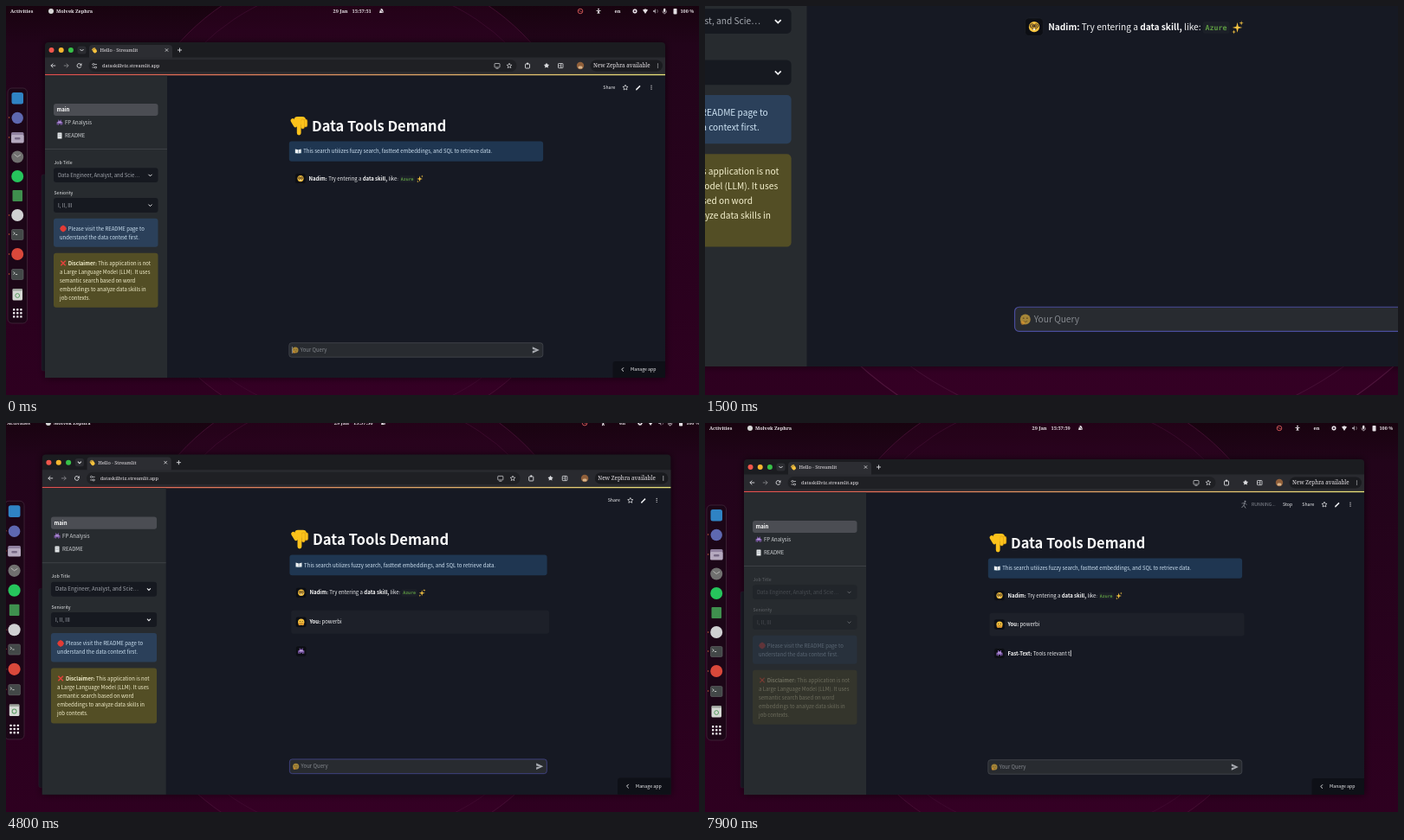
Animation, 800 px wide and 450 px high, one loop 8000 ms. Source, as an HTML page with a canvas:

```html
<!DOCTYPE html>
<html lang="en">
<head>
<meta charset="utf-8">
<title>Data Tools Demand</title>
<style>
html, body { margin: 0; height: 100%; overflow: hidden; background: #24041b; }
canvas { display: block; width: 800px; height: 450px; }
</style>
</head>
<body>
<canvas></canvas>
<script>
const LOOP = 8000;
const SANS = '"Noto Sans CJK JP","Noto Sans CJK SC","Noto Sans",sans-serif';
const SERIF = '"Noto Serif",serif';
const MONO = '"DejaVu Sans Mono",monospace';
const BODY = 5.96, SMALL = 5.2;
const canvas = document.querySelector('canvas');
const c = canvas.getContext('2d');
const dpr = window.devicePixelRatio || 1;
canvas.width = 800 * dpr;
canvas.height = 450 * dpr;

const clamp = v => Math.max(0, Math.min(1, v));
// Critically damped spring from 0 to 1
const spring = ms => ms <= 0 ? 0 : 1 - (1 + ms * .0147) * Math.exp(-ms * .0147);

function box(x, y, w, h, r, fill, stroke, lw = .6) {
  c.beginPath();
  c.roundRect(x, y, w, h, r);
  if (fill) { c.fillStyle = fill; c.fill(); }
  if (stroke) { c.strokeStyle = stroke; c.lineWidth = lw; c.stroke(); }
}
function dot(x, y, r, fill, stroke, lw = .6) {
  c.beginPath();
  c.arc(x, y, r, 0, 7);
  if (fill) { c.fillStyle = fill; c.fill(); }
  if (stroke) { c.strokeStyle = stroke; c.lineWidth = lw; c.stroke(); }
}
// Polyline from flat x, y pairs
function line(color, lw, ...p) {
  c.beginPath();
  for (let i = 0; i < p.length; i += 2) c.lineTo(p[i], p[i + 1]);
  c.strokeStyle = color;
  c.lineWidth = lw;
  c.stroke();
}
function poly(fill, ...p) {
  c.beginPath();
  for (let i = 0; i < p.length; i += 2) c.lineTo(p[i], p[i + 1]);
  c.fillStyle = fill;
  c.fill();
}
// y is the optical middle of the line; returns the x where the text ends
function text(s, x, y, color = '#f2f3f5', size = BODY, weight = 400, family = SANS) {
  c.font = `${weight} ${size}px ${family}`;
  c.fillStyle = color;
  c.fillText(s, x, y + size * .36);
  return x + c.measureText(s).width;
}
const serif = (s, x, y, size = 5.5, weight = 400) => text(s, x, y, '#e8e4e8', size, weight, SERIF);

function star(x, y, r, n, inner, fill, stroke) {
  c.beginPath();
  for (let i = 0; i < n * 2; i++) {
    const a = i * Math.PI / n - Math.PI / 2, d = i % 2 ? r * inner : r;
    c.lineTo(x + d * Math.cos(a), y + d * Math.sin(a));
  }
  c.closePath();
  if (fill) { c.fillStyle = fill; c.fill(); }
  if (stroke) { c.strokeStyle = stroke; c.lineWidth = .7; c.stroke(); }
}
const chevron = (x, y, color) => line(color, 1, x - 2, y - 1, x, y + 1, x + 2, y - 1);
const dots = (x, y) => { for (const d of [-2, 0, 2]) dot(x, y + d, .6, '#e8e8ea'); };

function invader(x, y, s) {
  c.save();
  c.translate(x, y);
  c.scale(s, s);
  c.fillStyle = '#8a63b8';
  for (const [a, b, w, h] of [[-2, -2.5, 4, 4], [-3.5, -1, 7, 1.7], [-3.5, .5, 1, 2],
    [2.5, .5, 1, 2], [-2, 1.5, 1, 1.3], [1, 1.5, 1, 1.3], [-2, -3.5, 1, 1], [1, -3.5, 1, 1]])
    c.fillRect(a, b, w, h);
  dot(-1, -.8, .6, '#fff');
  dot(1, -.8, .6, '#fff');
  c.restore();
}
function face(x, y, r, kind) {
  dot(x, y, r, '#f6c23e');
  dot(x - r * .35, y - r * .2, r * .15, '#4a3218');
  dot(x + r * .35, y - r * .2, r * .15, '#4a3218');
  line('#4a3218', r * .16, x - r * .4, y + r * .35, x, y + r * .5, x + r * .4, y + r * .35);
  if (kind === 'nerd') {
    dot(x - r * .4, y - r * .2, r * .36, null, '#3b2a20', r * .16);
    dot(x + r * .4, y - r * .2, r * .36, null, '#3b2a20', r * .16);
    c.fillStyle = '#fff';
    c.fillRect(x - r * .2, y + r * .36, r * .4, r * .25);
  } else {
    dot(x - r * .5, y + r * .7, r * .4, '#e0952c');
    if (kind === 'hug') dot(x + r * .5, y + r * .7, r * .4, '#e0952c');
  }
}
function book(x, y) {
  box(x - 3.8, y - 2.3, 7.6, 5, .6, '#3a5a72');
  poly('#f2f4f5', x - 3.4, y - 2.9, x - .2, y - 2, x - .2, y + 2.1, x - 3.4, y + 1.6);
  poly('#e4e8eb', x + 3.4, y - 2.9, x + .2, y - 2, x + .2, y + 2.1, x + 3.4, y + 1.6);
}
function pointDown() {
  const skin = '#fcc21b', shade = '#d99a12';
  c.save();
  c.translate(332, 135);
  c.rotate(-.55);
  box(-2, -5, 4.6, 11, 2.3, skin);
  c.restore();
  box(332.5, 128, 13.5, 9, 4, skin);
  [[343.8, 9], [340.5, 11]].forEach(([x, h]) => box(x, 131, 4, h, 2, skin, shade, .5));
  box(335.8, 131, 4.8, 18.5, 2.4, skin);
}
function wave(x, y) {
  c.save();
  c.translate(x, y);
  c.rotate(-.6);
  box(-2, -.8, 4.2, 4, 1.6, '#f6c23e');
  for (const i of [0, 1, 2, 3]) box(-2 + i * 1.1, -3.4 + Math.abs(i - 1.5) * .5, .9, 4, .45, '#f6c23e');
  c.restore();
}
function avatar(y) {
  box(333.8, y - 6, 12.2, 12, 2.5, '#0c0e14', '#20232c', .4);
}

function desktop() {
  const g = c.createLinearGradient(0, 0, 0, 450);
  g.addColorStop(0, '#18030f');
  g.addColorStop(.1, '#22041a');
  g.addColorStop(1, '#2e0020');
  c.fillStyle = g;
  c.fillRect(0, 0, 800, 450);
  dot(403, 225, 273, 'rgba(70,0,48,.25)', '#4f153c', .7);
  dot(403, 225, 252, null, '#461036', .6);
  box(41, 195, 8, 227, 2, '#1b1a26', '#3a2238', .4);
}

function topBar(t) {
  serif('Activities', 5, 6, 5.5, 600);
  dot(52, 6, 3, '#d8d8d8');
  serif('Molvek Zephra', 58, 6, 5.5, 600);
  const sec = 51 + Math.floor((t + 400) / 1000);
  serif('29 Jan', 377.5, 6, 5.6, 600);
  serif('15:57:' + sec, 399.5, 6, 5.6, 600);
  const w = '#e4dfe4';
  poly(w, 431, 8, 432, 4, 433.5, 3, 435, 4, 436, 8);
  line('#26051d', .7, 431, 3, 436.5, 9);
  dot(663, 6, 2.8, null, '#d65a5a', .9);
  line('#d65a5a', .7, 661, 5, 665, 7);
  dot(684, 3.7, .9, w);
  line(w, .9, 681.5, 5.5, 686.5, 5.5);
  line(w, 1, 683, 9, 684, 5.5, 685, 9);
  serif('en', 702.5, 6, 5.6, 600);
  star(726, 6, 3.2, 8, .7, w);
  dot(726, 6, 1, '#26051d');
  poly(w, 735, 4.5, 738, 3.3, 741, 4.5, 738, 9);
  poly('#9c929c', 747, 5, 748.5, 5, 750, 3, 750, 9, 748.5, 7, 747, 7);
  line('#9c929c', .6, 751.5, 4, 752.5, 6, 751.5, 8);
  box(759, 2.8, 2.4, 4.2, 1.2, w);
  line(w, .6, 758, 5.5, 758.5, 8, 762, 8, 762.5, 5.5);
  line(w, .6, 760.2, 8, 760.2, 9.5);
  box(770.5, 3, 4, 6.5, .8, w);
  serif('100 %', 778.5, 6, 5.5, 600);
}

function dock() {
  box(2, 95, 22.5, 272, 5, '#1c0617', '#4b3346', .6);
  box(6.5, 100, 13.5, 13.5, 2.5, '#2f83c4');
  dot(13.2, 129.5, 6.7, '#5e68b0');
  box(6, 146, 14.5, 12, 1.5, '#8f809e');
  box(6, 149, 14.5, 9.5, 1.5, '#b5a9bf');
  box(10, 152, 6.5, 2.5, 1, '#776985');
  dot(13.2, 174.5, 7, '#70706f');
  line('#c8c8c6', .8, 9.5, 171.5, 13.2, 174.5, 17, 172);
  dot(13.2, 197, 7, '#26c45c');
  box(7.5, 213, 11.5, 13, 1, '#3f8f4e');
  dot(13.2, 242, 7, '#d0d0d2');
  dot(13.2, 287, 7, '#d9483b');
  for (const y of [264.5, 310.5]) {
    box(6.5, y - 6, 13.5, 12, 1.5, '#434848', '#6c7070', .5);
    line('#dfe3e0', .8, 8.5, y - 3, 10.3, y - 1.5, 8.5, y);
    line('#dfe3e0', .8, 11, y, 13.2, y);
  }
  box(7.5, 327.5, 11.5, 13, 1.5, '#d5d8d4');
  box(7.5, 327, 11.5, 2.5, 1, '#9da39c');
  dot(13.2, 335, 2.4, null, '#5b9c62', 1);
  for (let i = 0; i < 9; i++) box(8 + i % 3 * 4.1, 350 + (i / 3 | 0) * 4.1, 2.4, 2.4, .7, '#f0edf0');
  for (const y of [129, 152, 242, 264, 287, 310]) dot(3.6, y, .7, '#c65c36');
}

function browser() {
  c.save();
  c.shadowColor = 'rgba(0,0,0,.6)';
  c.shadowBlur = 8 * dpr;
  box(45, 42, 716, 388, [4, 4, 0, 0], '#1b1c20');
  c.restore();
  ['#f0564c', '#f5b72f', '#37c148'].forEach((color, i) => dot(52.5 + i * 11.2, 51, 3, color));
  box(82.5, 46.5, 10, 9, 2.5, '#2b2c31');
  chevron(87.5, 51, '#dcdde0');
  box(96, 45, 96, 17, [4, 4, 0, 0], '#2c2d32');
  wave(102, 51.3);
  serif('Hello · Streamlit', 108.5, 51, 5.7);
  const ic = '#dadbde';
  line(ic, .8, 183.8, 49.3, 187.2, 52.7);
  line(ic, .8, 187.2, 49.3, 183.8, 52.7);
  line(ic, .9, 198, 51, 203, 51);
  line(ic, .9, 200.5, 48.5, 200.5, 53.5);
  box(45, 59.5, 716, 19, 0, '#292a2f');
  for (const [x, d, color] of [[54.5, 1, ic], [69.5, -1, '#85868a']]) {
    line(color, .9, x - 2.7 * d, 69, x + 2.7 * d, 69);
    line(color, .9, x - .2 * d, 66.6, x - 2.6 * d, 69, x - .2 * d, 71.4);
  }
  c.beginPath();
  c.arc(84.5, 69, 2.4, .3, 5.5);
  c.strokeStyle = ic; c.lineWidth = .9; c.stroke();
  poly(ic, 87.4, 66, 87.4, 69, 84.8, 68.6);
  box(95.5, 62, 494, 14, 7, '#1f2024');
  line(ic, .7, 99.5, 67.5, 105, 67.5);
  line(ic, .7, 99.5, 71, 105, 71);
  dot(101, 67.5, 1.1, '#222327', ic);
  dot(103.5, 71, 1.1, '#222327', ic);
  serif('dataskillviz.streamlit.app', 111, 69);
  box(564, 66.5, 6, 4.5, .6, null, ic, .7);
  line(ic, .7, 565.5, 72.3, 568.5, 72.3);
  star(581, 69.2, 3, 5, .45, null, ic);
  box(599.5, 67, 5, 5, .6, null, ic, .9);
  dot(602, 66.6, 1.1, ic);
  star(624, 69, 3.2, 5, .55, ic);
  box(637.5, 66.5, 5.5, 5.2, .6, null, ic, .8);
  line(ic, .8, 640.8, 66.5, 640.8, 71.7);
  line(ic, .6, 637.5, 69, 640.8, 69);
  dot(663, 69, 4.2, '#8f5f3a');
  box(660.5, 69.5, 5, 3, 1.5, '#d8b48a');
  box(674.5, 62.5, 83.5, 13, 6.5, '#1a1b1f');
  serif('New Zephra available', 678, 69, 6.3);
  dots(752.5, 69);
  box(45, 78, 716, 352, 0, '#161923');
  const g = c.createLinearGradient(45, 0, 761, 0);
  g.addColorStop(0, '#e2504f');
  g.addColorStop(.5, '#e09a63');
  g.addColorStop(1, '#e8e27a');
  c.fillStyle = g;
  c.fillRect(45, 78.8, 716, 1.4);
}

function select(label, value, y) {
  text(label, 55.5, y, '#e6e8ea', SMALL);
  box(55, y + 6.3, 120.5, 16.8, 3, '#161920');
  text(value, 60, y + 14.7, '#a4a8af');
  chevron(166.5, y + 14.8, '#f0f1f3');
}

function sidebar(t) {
  box(45, 80.2, 141, 349.8, 0, '#272b2f');
  box(55, 113, 120.5, 14, 3, '#4b4d53');
  text('main', 58.5, 120, '#fff', BODY, 700);
  invader(62, 135, .95);
  text('FP Analysis', 68, 135, '#d4d7da');
  box(59.5, 146.5, 5, 7, .5, '#e3e6e8');
  line('#7e8890', .5, 60.5, 148.5, 63.5, 148.5);
  line('#7e8890', .5, 60.5, 150.5, 63.5, 150.5);
  text('README', 68, 150, '#d4d7da');
  line('#4c5055', .6, 45, 165.5, 186, 165.5);

  const fade = clamp((t - 5600) / 800);
  c.globalAlpha = 1 - .7 * fade * (2 - fade);
  select('Job Title', 'Data Engineer, Analyst, and Scie…', 181);
  select('Seniority', 'I, II, III', 215.8);
  box(55, 245.8, 120.5, 33, 3, '#2b405a');
  star(66, 257.5, 3.9, 4, .9, '#e23b35');
  text('Please visit the README page to', 71.8, 257.5, '#cfe4f5');
  text('understand the data context first.', 62, 267.6, '#cfe4f5');
  box(55, 285.8, 120.5, 63, 3, '#534e25');
  line('#e3423c', 1.5, 63.3, 294.8, 68.7, 300.2);
  line('#e3423c', 1.5, 68.7, 294.8, 63.3, 300.2);
  const sand = '#f6f2cf';
  const x = text('Disclaimer:', 71.8, 297.5, sand, BODY, 700);
  text(' This application is not', x, 297.5, sand);
  ['a Large Language Model (LLM). It uses', 'semantic search based on word',
    'embeddings to analyze data skills in', 'job contexts.']
    .forEach((s, i) => text(s, 62, 307.5 + i * 10.05, sand));
  c.globalAlpha = 1;
}

function header(t) {
  const w = '#f0f1f3';
  if (t >= 5400) {
    const k = Math.floor(t / 200) % 2 ? 1 : -1, gray = '#8b8f97';
    dot(623.5, 90.8, 1, gray);
    line(gray, .9, 623, 92, 622, 95.2, 622 + 2.2 * k, 98.5);
    line(gray, .9, 622, 95.2, 620 - k * .5, 98);
    line(gray, .7, 619.5, 93, 622.7, 92.6, 625.5, 94.5);
    text('RUNNING...', 631, 94.2, gray, SMALL);
    text('Stop', 667, 94.2, w, SMALL);
  }
  text('Share', 689.3, 94.2, w, SMALL);
  star(715, 94.4, 3.2, 5, .48, null, w);
  line(w, 1.5, 728, 96.4, 732, 92.4);
  poly(w, 727, 97.4, 727.4, 95.4, 729, 97);
  dots(745, 94.2);
}

function chat(t) {
  pointDown();
  text('Data Tools Demand', 353, 139, '#fafafa', 16.4, 700);
  box(326.8, 156.5, 293.3, 23.3, 3, '#1f3651');
  book(337.3, 168.3);
  text('This search utilizes fuzzy search, fasttext embeddings, and SQL to retrieve data.', 343.3, 168.2, '#d3e6f6');

  avatar(199.6);
  face(340, 199.6, 3.6, 'nerd');
  let x = text('Nadim:', 349.5, 199.5, '#fafafa', BODY, 700);
  x = text(' Try entering a ', x, 199.5);
  x = text('data skill,', x, 199.5, '#fafafa', BODY, 700);
  x = text(' like: ', x, 199.5);
  box(x, 196, 18, 8, 1.5, '#1c2028');
  text('Azure', x + 1.6, 200, '#5d9a42', 4.87, 700, MONO);
  star(x + 23.3, 200, 3.4, 4, .3, '#f5c341');
  star(x + 26, 197, 1.6, 4, .3, '#f5c341');
  star(x + 21, 203, 1.4, 4, .3, '#f5c341');

  if (t < 4500) return;
  box(328.5, 219.7, 294, 26.8, 3, '#1d2029');
  avatar(233.1);
  face(340, 233.1, 3.6, 'hug');
  x = text('You:', 349.5, 233, '#fafafa', BODY, 700);
  text(' powerbi', x, 233);
  avatar(266.5);
  invader(340, 266.6, 1);
  if (t < 7000) return;
  x = text('Fast-Text:', 349.5, 266.4, '#fafafa', BODY, 700);
  x = text(' ' + 'Tools relevant t'.slice(0, Math.floor((t - 7080) / 50)), x, 266.4);
  line('#fafafa', .8, x + 1, 262.8, x + 1, 270);
}

function queryBox(t) {
  const focused = t >= 850 && t < 5500;
  box(326.8, 389.7, 293, 16.5, 3, '#282b30', focused ? '#4a4c9c' : '#4b4e55', .7);
  const typed = t >= 3800 ? 0 : [1900, 2100, 2250, 2400, 2550, 2900, 3100].filter(k => t >= k).length;
  if (typed) {
    const x = text('powerbi'.slice(0, typed), 330.6, 398, '#fafafa');
    line('#fafafa', .6, x + .4, 394, x + .4, 402);
  } else {
    c.globalAlpha = .6;
    face(334, 398, 3.5, 'think');
    c.globalAlpha = 1;
    text('Your Query', 339.8, 398, '#85898f');
    if (t < 500) line('#b9bbc0', .6, 330.4, 394, 330.4, 402);
  }
  poly('#a9acb2', 607.8, 394.3, 615.8, 398, 607.8, 401.7, 607.8, 398.9, 612, 398, 607.8, 397.1);
  box(700.5, 411, 60.5, 19, [3, 0, 0, 0], '#0e1017');
  line('#f0f1f3', .9, 713, 418.3, 710.8, 420.5, 713, 422.7);
  text('Manage app', 721, 420.4, '#f0f1f3', SMALL, 500);
}

function draw(t) {
  const zoom = 1 + .705 * (spring(t - 815) - spring(t - 4400));
  c.setTransform(dpr, 0, 0, dpr, 0, 0);
  c.translate(283.2, 448.5);
  c.scale(zoom, zoom);
  c.translate(-283.2, -448.5);
  desktop();
  topBar(t);
  dock();
  browser();
  sidebar(t);
  header(t);
  chat(t);
  queryBox(t);
}

const start = performance.now();
function tick() {
  draw((performance.now() - start) % LOOP);
  requestAnimationFrame(tick);
}
tick();
</script>
</body>
</html>
```
